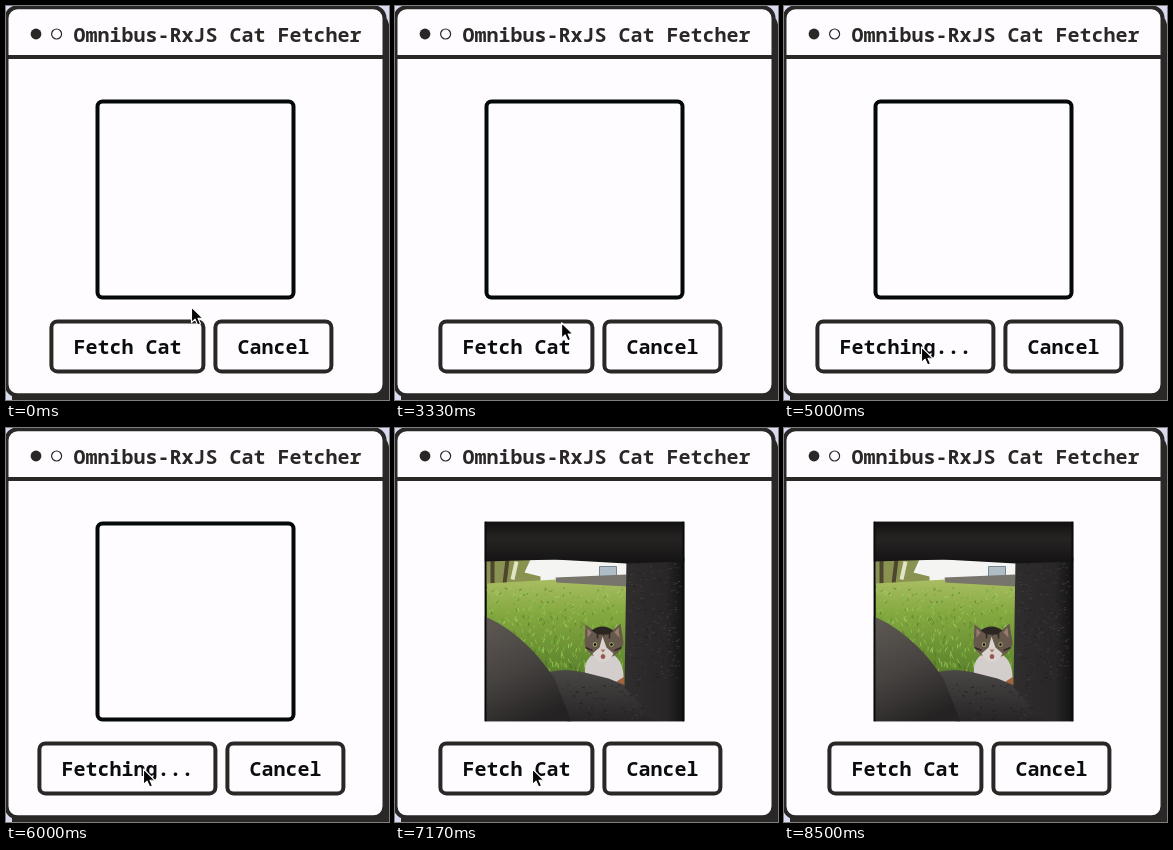
Write an HTML page that moves like this. It is 383 px wide and 394 px high and loops after 8.67 s.

```html
<!DOCTYPE html>
<html lang="en">
<head>
<meta charset="utf-8">
<title>Cat Fetcher</title>
<style>
  html, body { margin: 0; width: 100%; height: 100%; overflow: hidden; background: #d9daf0; }
  svg { display: block; width: 100vw; height: 100vh; }
  text { font: 600 20px "Noto Sans Mono", "DejaVu Sans Mono", monospace; fill: #0b0c0e; white-space: pre; }
  .title { fill: #2a2826; }
  .frame { fill: #fefcff; stroke: #2a2826; stroke-width: 4; }
</style>
</head>
<body>
<svg viewBox="0 0 383 394">
  <defs>
    <linearGradient id="lawn" x1="0" y1="0" x2="0" y2="1">
      <stop offset="0" stop-color="#a9bd62"/>
      <stop offset=".3" stop-color="#84a840"/>
      <stop offset="1" stop-color="#4c7426"/>
    </linearGradient>
    <linearGradient id="rock" x1=".2" y1="0" x2=".6" y2="1">
      <stop offset="0" stop-color="#5c5751"/>
      <stop offset=".5" stop-color="#464240"/>
      <stop offset="1" stop-color="#242222"/>
    </linearGradient>
    <linearGradient id="slab" x1="0" y1="0" x2="0" y2="1">
      <stop offset="0" stop-color="#4a4847"/>
      <stop offset="1" stop-color="#262424"/>
    </linearGradient>
    <linearGradient id="pillar">
      <stop offset="0" stop-color="#2f2d2d"/>
      <stop offset=".7" stop-color="#282626"/>
      <stop offset="1" stop-color="#121111"/>
    </linearGradient>
    <linearGradient id="beam" x1="0" y1="0" x2="0" y2="1">
      <stop offset="0" stop-color="#111010"/>
      <stop offset=".4" stop-color="#262423"/>
      <stop offset="1" stop-color="#141313"/>
    </linearGradient>
    <clipPath id="photoClip"><rect width="200" height="200"/></clipPath>
  </defs>

  <rect x="6" y="8" width="377" height="400" rx="12" fill="#2a2826"/>
  <rect class="frame" x=".5" y="1.3" width="378" height="388" rx="11"/>
  <path d="M0 51H379" stroke="#2a2826" stroke-width="4"/>
  <circle cx="30" cy="28" r="5.4" fill="#2a2826"/>
  <circle cx="50.6" cy="28" r="5" fill="none" stroke="#2a2826" stroke-width="1.2"/>
  <text class="title" x="67.5" y="35.5">Omnibus-RxJS Cat Fetcher</text>

  <rect id="emptyBox" x="91.5" y="95.5" width="196" height="196" rx="5" fill="#fefcff" stroke="#05090c" stroke-width="4"/>

  <g id="photo" transform="translate(89.5 93.5)" clip-path="url(#photoClip)">
    <rect width="200" height="200" fill="#191818"/>
    <rect x="2" y="38" width="141" height="24" fill="#f4f5f2"/>
    <path d="M2 38H46L40 51L56 55V64H2Z" fill="#8a9252"/>
    <path d="M8 38V62M23 38L20 62" stroke="#4d4530" stroke-width="4"/>
    <path d="M32 40L28 58" stroke="#e3e4c4" stroke-width="4"/>
    <path d="M115 55V45H132V55" fill="#aebdc6" stroke="#77858d"/>
    <path d="M2 62L72 58L142 63V173H2Z" fill="url(#lawn)"/>
    <path d="M71 56L142 53V65L72 61Z" fill="#77746b"/>
    <g id="grass" stroke-linecap="round"></g>
    <g id="cat">
      <path d="M101 154C98 141 106 130 119 130C133 131 140 143 139 160L118 162Z" fill="#d3cdcb"/>
      <path d="M101 103L109 109Q118 104 128 109L136 102L139 121Q137 134 119 138Q101 134 100 121Z" fill="#66594b"/>
      <path d="M107 109Q118 101 129 109L124 113H113Z" fill="#2b2622"/>
      <path d="M103 107L107 111L103 116ZM134 106L130 111L135 116Z" fill="#9a7d70"/>
      <path d="M118 115L122 126L129 132Q125 141 118 141Q111 140 108 132L115 126Z" fill="#dbd3cf"/>
      <path d="M113 110V117M119 108V114M125 110V117M101 126L108 129M137 126L130 129" stroke="#2d2722" stroke-width="1.5"/>
      <circle cx="110.5" cy="123" r="2.2" fill="#aaa873"/><circle cx="127" cy="123" r="2.2" fill="#aaa873"/>
      <circle cx="110.5" cy="123" r="1.2"/><circle cx="127" cy="123" r="1.2"/>
      <path d="M116 128H121L118.5 131Z" fill="#a8766c"/>
      <ellipse cx="118.5" cy="135" rx="2.3" ry="2.5" fill="#945850"/>
      <path d="M132 160L140 155V166Z" fill="#a4633f"/>
    </g>
    <path d="M62 151Q80 146 100 151L124 157L146 166L172 200H83Z" fill="url(#slab)"/>
    <path d="M0 95C25 105 50 127 70 157L87 200H0Z" fill="url(#rock)"/>
    <path d="M142 36H200V200H172L140 166Z" fill="url(#pillar)"/>
    <g id="stone"></g>
    <path d="M0 0H200V40L142 42L70 38L0 40Z" fill="url(#beam)"/>
    <path d="M1 0V200M199 0V200" stroke="#0b0b0b" stroke-width="2"/>
  </g>

  <g id="fetch">
    <rect class="frame" y="315.4" height="50" rx="6"/>
    <text y="348"></text>
  </g>
  <g id="cancel">
    <rect class="frame" y="315.4" height="50" rx="6"/>
    <text y="348"></text>
  </g>

  <path id="cursor" d="M0 0V15.5L3.6 12.2L6.2 18L9 16.8L6.5 11.2H11.2Z" fill="#050505" stroke="#fff" stroke-width="1.1" stroke-linejoin="round"/>
</svg>
<script>
  const LOOP = 8670;
  const STEP = 1000 / 6;
  const byId = id => document.getElementById(id);

  let seed = 17;
  const random = () => (seed = (seed * 16807) % 2147483647) / 2147483647;

  function addStroke(group, x, y, dx, dy, color) {
    const line = document.createElementNS("http://www.w3.org/2000/svg", "path");
    line.setAttribute("d", `M${x} ${y}l${dx} ${dy}`);
    line.setAttribute("stroke", color);
    group.append(line);
  }

  function paintTexture() {
    for (let i = 0; i < 520; i++) {
      const depth = random();
      const light = 25 + random() * 30 + (1 - depth) * 10;
      addStroke(byId("grass"), 2 + random() * 138, 67 + depth * 97,
        random() * 4 - 2, -1 - depth * 4, `hsl(${78 + random() * 16} 48% ${light}%)`);
    }
    for (let i = 0; i < 420; i++) {
      const y = 42 + random() * 156;
      const x = y < 162 ? 144 + random() * 51 : 75 + (y - 162) * 0.3 + random() * 80;
      addStroke(byId("stone"), x, y, 1 + random() * 2, random() * 2 - 1,
        `hsl(15 3% ${11 + random() * 14}%)`);
    }
  }

  function setButton(id, x, label) {
    const [box, text] = byId(id).children;
    box.setAttribute("x", x + 2);
    box.setAttribute("width", label.length * 12 + 44);
    text.setAttribute("x", x + 24);
    if (text.textContent !== label) text.textContent = label;
  }

  function ease(time, start, end) {
    const p = Math.min(1, Math.max(0, (time - start) / (end - start)));
    return p * p * (3 - 2 * p);
  }

  function render(time) {
    const fetching = time >= 5000 && time < 7165;
    const loaded = time >= 7165;
    setButton("fetch", fetching ? 31.4 : 43.4, fetching ? "Fetching..." : "Fetch Cat");
    setButton("cancel", fetching ? 219.4 : 207.4, "Cancel");
    byId("photo").style.display = loaded ? "" : "none";
    byId("emptyBox").style.display = loaded ? "none" : "";

    // The pointer moves in sixths of a second.
    const stepped = Math.floor((time + 5) / STEP) * STEP;
    const approach = ease(stepped, 2833, 4000);
    const leave = ease(stepped, 7333, 8500);
    const x = 185.5 - 48 * approach + 14 * leave;
    const y = 301 + 40 * approach + 57 * leave;
    byId("cursor").setAttribute("transform", `translate(${x} ${y})`);
  }

  const start = performance.now();
  function tick() {
    render((performance.now() - start) % LOOP);
    requestAnimationFrame(tick);
  }

  paintTexture();
  tick();
</script>
</body>
</html>
```
